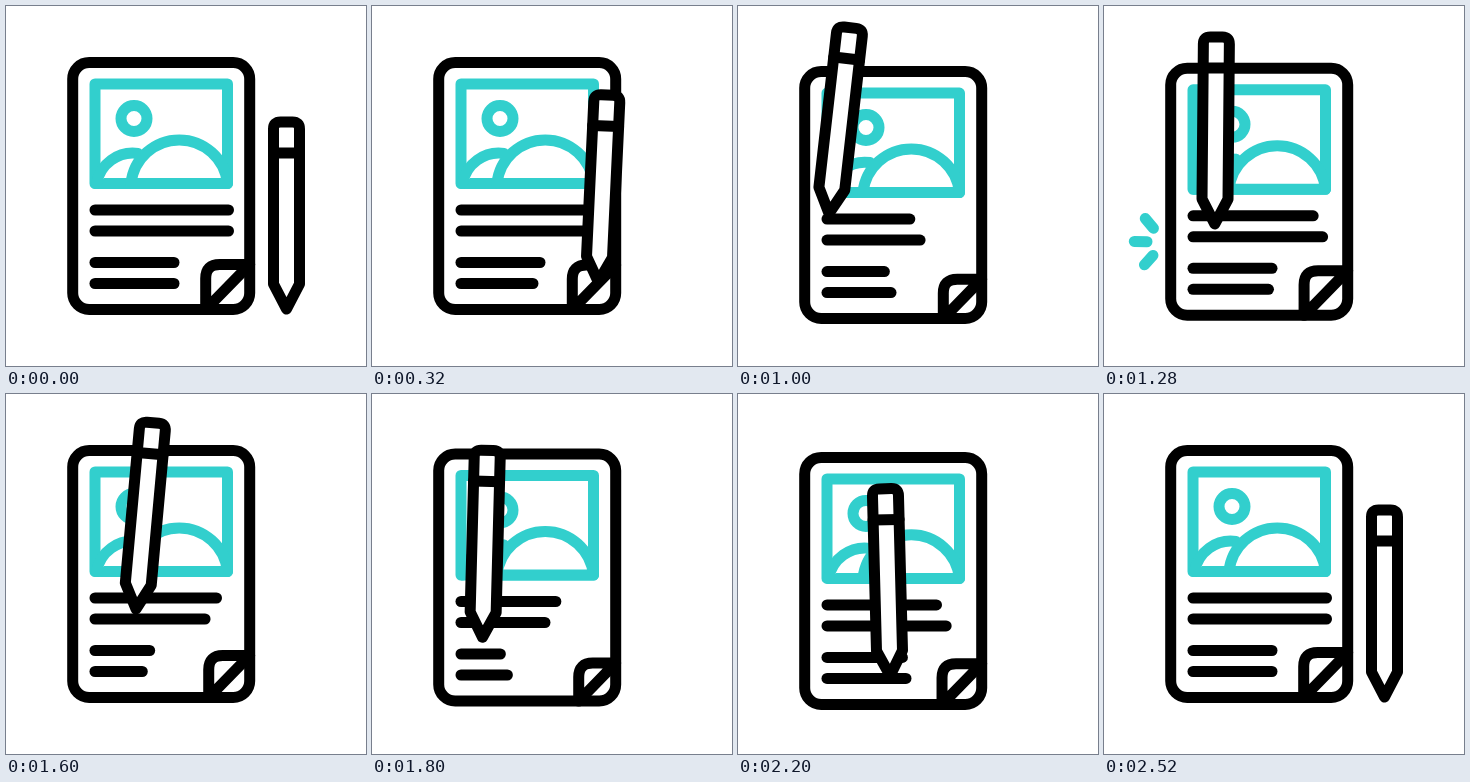
An HTML page that plays this animation: 360 px wide and 360 px high, repeating every 3000 ms.

```html
<!DOCTYPE html>
<html lang="en">
<head>
<meta charset="utf-8">
<title>Writing a page</title>
<style>
  html, body { margin: 0; width: 100%; height: 100%; overflow: hidden; background: #fff; }
  svg { display: block; width: 100vw; height: 100vh; }
  .ink, .teal { fill: #fff; stroke-width: 11; stroke-linecap: round; stroke-linejoin: round; }
  .ink { stroke: #000; }
  .teal { stroke: #32cfcd; }
</style>
</head>
<body>
<svg viewBox="0 0 360 360">
  <g id="page">
    <rect class="ink" x="66.7" y="56.5" width="177" height="247" rx="16.5"/>
    <g class="teal">
      <rect x="89" y="78" width="132.5" height="99.5"/>
      <circle cx="128" cy="112.5" r="13"/>
      <path d="M90.5 177.5A37 37 0 0 1 132 147.5"/>
      <path d="M125 177.5A48.5 48.5 0 0 1 221.5 177.5Z"/>
    </g>
    <g id="lines" class="ink"></g>
    <path id="fold" class="ink" fill="none"/>
  </g>
  <g id="bursts" class="teal"></g>
  <g id="pencil" class="ink">
    <path d="M-13 -25V-180Q-13 -187 -6 -187H6Q13 -187 13 -180V-25L0 0Z"/>
    <path d="M-13 -156H13"/>
  </g>
</svg>
<script>
const LOOP = 3000, STEP = 40, CYCLE = 1000, START = 240;
const el = id => document.getElementById(id);
const clamp = v => Math.min(1, Math.max(0, v));
const ease = u => (1 - Math.cos(Math.PI * u)) / 2;

function addPath(parent) {
  const p = document.createElementNS('http://www.w3.org/2000/svg', 'path');
  return parent.appendChild(p);
}

// Pencil: time, tip x, tip y, tilt
const rest = [280.5, 303, 0];
const poses = [
  [200, ...rest], [520, 105, 215, 8.7], [740, 94, 201, 8], [1000, 91, 207.5, 6.5],
  [1280, 110.8, 218, 0.5], [1600, 130, 215, 5.2], [2000, 91, 271.5, -2.2], [2520, ...rest]
];

function pencilAt(t) {
  const i = poses.findIndex(p => p[0] > t);
  if (i < 1) return rest;
  const [t0, ...a] = poses[i - 1], [t1, ...b] = poses[i];
  const k = ease((t - t0) / (t1 - t0));
  return a.map((v, n) => v + (b[n] - v) * k);
}

// The page is knocked down fast once per cycle, then drifts back
function drop(t) {
  if (t < 760 || t > 2520) return 0;
  const age = (t - 760) % CYCLE, p = clamp((age - 120) / 620);
  return age < 120 ? 14 * ease(age / 120) : (1 - p) * (14 - 3 * Math.sin(2 * Math.PI * p));
}

// The folded corner shrinks and grows twice
const curl = t => t < 220 || t > 2500 ? 0 : 8 * Math.sin(Math.PI * (t - 220) / 1140) ** 2;

// Text lines from the bottom up, each starting a little later
const lines = [277.5, 256.5, 225, 204].map((y, i) => {
  const long = i > 1, from = START + 90 * i, to = START + 930 + 70 * i;
  return {
    path: addPath(el('lines')), y, right: long ? 222.5 : 168, depth: long ? 58 : 41,
    mid: (from + to) / 2, half: (to - from) / 2
  };
});

function lineEnd({ right, depth, mid, half }, t) {
  const cut = at => depth * Math.max(0, 1 - Math.abs(t - at) / half);
  return right - cut(mid) - cut(mid + CYCLE);
}

// Three rays fan out to the left of the page
function addBurst(start, x, y, turn) {
  const rays = [-1, 0, 1].map(i => {
    const path = addPath(el('bursts'));
    path.setAttribute('transform', `translate(${x} ${y}) rotate(${turn + 49 * i})`);
    return path;
  });
  return { start, rays };
}
const bursts = [addBurst(1180, 61, 236, 1), addBurst(1910, 60, 271, 7)];

function rayPath(age) {
  if (age <= 0 || age >= 240) return '';
  const tip = 18 + 14 * clamp(age / 110), tail = 18 + 14 * clamp((age - 140) / 100);
  return `M${-tail} 0H${-tip}`;
}

function draw(t) {
  const [x, y, tilt] = pencilAt(t);
  el('pencil').setAttribute('transform', `translate(${x} ${y}) rotate(${tilt})`);
  el('page').setAttribute('transform', `translate(0 ${drop(t)})`);
  for (const line of lines)
    line.path.setAttribute('d', `M89 ${line.y}H${lineEnd(line, t)}`);
  for (const { start, rays } of bursts)
    for (const ray of rays) ray.setAttribute('d', rayPath(t - start));
  const fx = 199.7 + curl(t), fy = 258.5 + curl(t);
  el('fold').setAttribute('d',
    `M${fx} 303.5V${fy + 14}Q${fx} ${fy} ${fx + 14} ${fy}H243.7L${fx} 303.5`);
}

const begin = performance.now();
function tick() {
  const t = (performance.now() - begin) % LOOP;
  draw(Math.floor(t / STEP) * STEP);
  requestAnimationFrame(tick);
}
tick();
</script>
</body>
</html>
```
